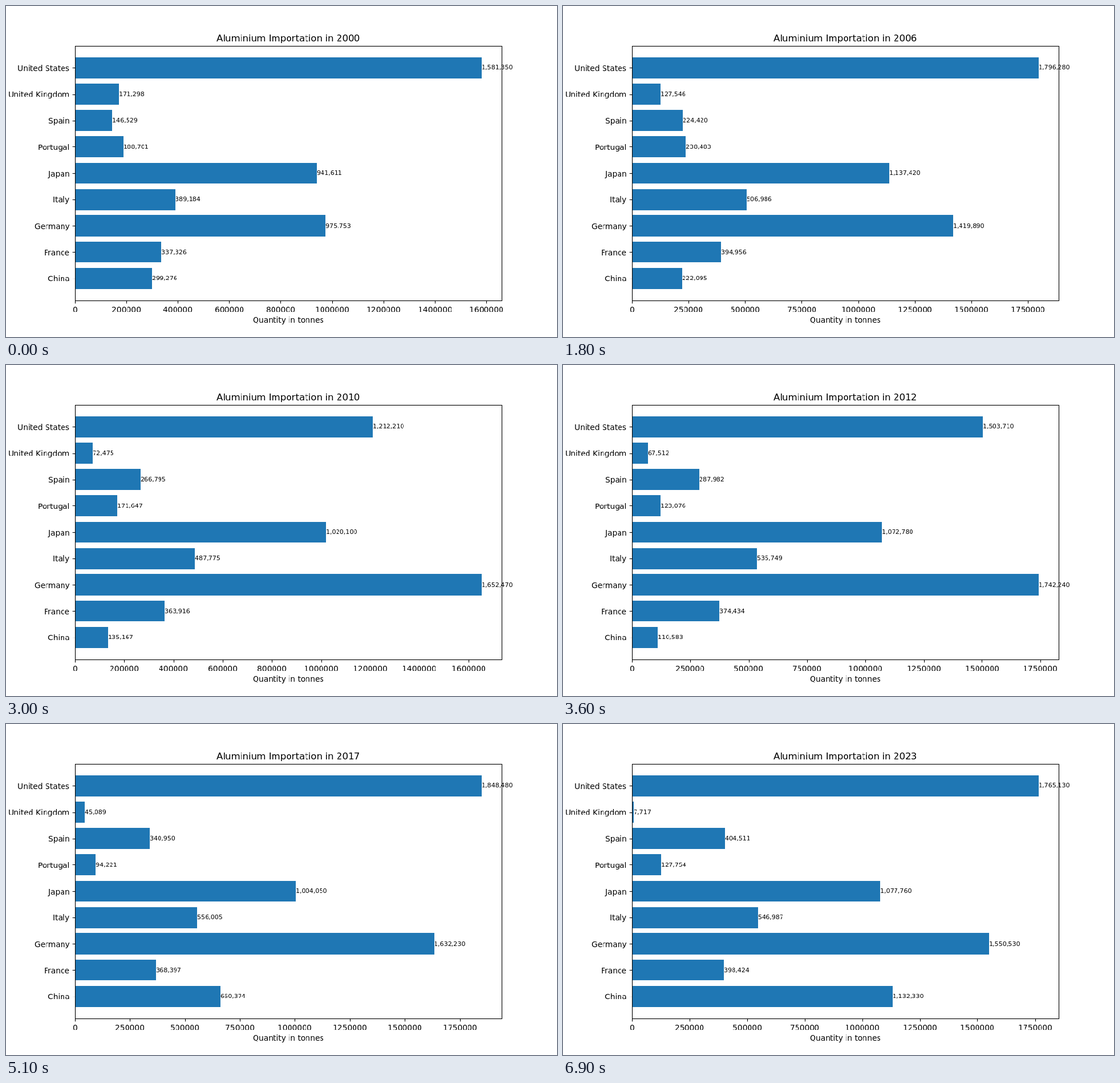
An HTML page with a canvas for the animation above (7.2 s loop, 966 by 580 pixels).

```html
<!DOCTYPE html>
<html lang="en">
<head>
<meta charset="utf-8">
<title>Aluminium Importation</title>
<style>
  html, body { margin: 0; width: 100%; height: 100%; overflow: hidden; background: #fff; }
  canvas { display: block; }
</style>
</head>
<body>
<canvas id="stage" width="966" height="580"></canvas>
<script>
// The chart is laid out at 1000 x 600 and reduced to the stage without smoothing.
const W = 1000, H = 600, DPI = 100;
const stage = document.getElementById('stage').getContext('2d');
const sheet = document.createElement('canvas');
sheet.width = W;
sheet.height = H;
const ctx = sheet.getContext('2d');
stage.imageSmoothingEnabled = false;

const STEP_MS = 300, FIRST_YEAR = 2000, YEARS = 24;
const LEFT = W * 0.125, RIGHT = W * 0.9, TOP = H * 0.12, BOTTOM = H * 0.89;
const BAR = 0.8, MARGIN = 0.05;
const pt = n => n * DPI / 72;

const COUNTRIES = ['China', 'France', 'Germany', 'Italy', 'Japan',
  'Portugal', 'Spain', 'United Kingdom', 'United States'];

// Tonnes per country in the key years; the years between are interpolated.
const KEYS = {
  2000: [299276, 337326, 975753, 389184, 941611, 188701, 146529, 171298, 1581350],
  2003: [335649, 324997, 1099140, 453088, 899215, 186494, 168244, 140942, 1279400],
  2006: [222095, 394956, 1419890, 506986, 1137420, 238483, 224420, 127546, 1796280],
  2010: [135167, 363916, 1652470, 487775, 1020100, 171647, 266795, 72475, 1212210],
  2014: [85998, 384952, 1832000, 583722, 1125460, 74504, 309169, 62549, 1795210],
  2020: [1234750, 351842, 1432460, 528287, 882636, 113937, 372731, 27628, 1901755],
  2023: [1132330, 398424, 1550530, 546987, 1077760, 127754, 404511, 7717, 1765130]
};
const KEY_YEARS = Object.keys(KEYS).map(Number);

function valuesIn(year) {
  if (KEYS[year]) return KEYS[year];
  const after = KEY_YEARS.find(k => k > year);
  const before = KEY_YEARS[KEY_YEARS.indexOf(after) - 1];
  const f = (year - before) / (after - before);
  return KEYS[before].map((v, i) => {
    const mixed = Math.round(v + (KEYS[after][i] - v) * f);
    return Number(mixed.toPrecision(6));
  });
}

// Smallest 1, 2, 2.5 or 5 times a power of ten giving at most nine intervals.
function tickStep(span) {
  const raw = span / 9;
  const unit = 10 ** Math.floor(Math.log10(raw));
  return unit * [1, 2, 2.5, 5, 10].find(m => m * unit >= raw);
}

const snap = v => Math.round(v) + 0.5;

function line(x1, y1, x2, y2) {
  ctx.beginPath();
  ctx.moveTo(x1, y1);
  ctx.lineTo(x2, y2);
  ctx.stroke();
}

function text(str, x, y, size, align = 0) {
  ctx.font = `${pt(size)}px "DejaVu Sans", sans-serif`;
  ctx.fillText(str, Math.round(x - ctx.measureText(str).width * align), Math.round(y));
}

function draw(year) {
  const values = valuesIn(year);
  const xMax = Math.max(...values) * (1 + MARGIN);
  const px = v => LEFT + v / xMax * (RIGHT - LEFT);
  const extent = COUNTRIES.length - 1 + BAR;
  const pad = BAR / 2 + extent * MARGIN;
  const unit = (BOTTOM - TOP) / (extent * (1 + 2 * MARGIN));
  const py = row => BOTTOM - (row + pad) * unit;

  ctx.fillStyle = '#fff';
  ctx.fillRect(0, 0, W, H);

  ctx.fillStyle = '#1f77b4';
  values.forEach((v, row) => {
    const y = Math.round(py(row + BAR / 2));
    ctx.fillRect(LEFT, y, Math.round(px(v)) - LEFT, Math.round(py(row - BAR / 2)) - y);
  });

  ctx.strokeStyle = ctx.fillStyle = '#000';
  ctx.lineWidth = pt(0.8);
  const step = tickStep(xMax), tick = pt(3.5);
  for (let v = 0; v <= xMax; v += step) {
    const x = snap(px(v));
    line(x, snap(BOTTOM), x, snap(BOTTOM) + tick);
    text(String(v), px(v), 555, 10, 0.5);
  }
  ctx.strokeRect(snap(LEFT), snap(TOP), RIGHT - LEFT, BOTTOM - TOP);

  values.forEach((v, row) => {
    const y = py(row);
    line(snap(LEFT) - tick, snap(y), snap(LEFT), snap(y));
    text(COUNTRIES[row], LEFT - 2 * tick, y + 5.5, 10, 1);
    text(v.toLocaleString('en-US'), px(v), y + 3.4, 8);
  });

  const middle = (LEFT + RIGHT) / 2;
  text('Quantity in tonnes', middle, 574, 10, 0.5);
  text(`Aluminium Importation in ${year}`, middle, TOP - pt(6), 12, 0.5);

  stage.drawImage(sheet, 0, 0, stage.canvas.width, stage.canvas.height);
}

function frame() {
  draw(FIRST_YEAR + Math.floor(performance.now() / STEP_MS) % YEARS);
  requestAnimationFrame(frame);
}
frame();
</script>
</body>
</html>
```
